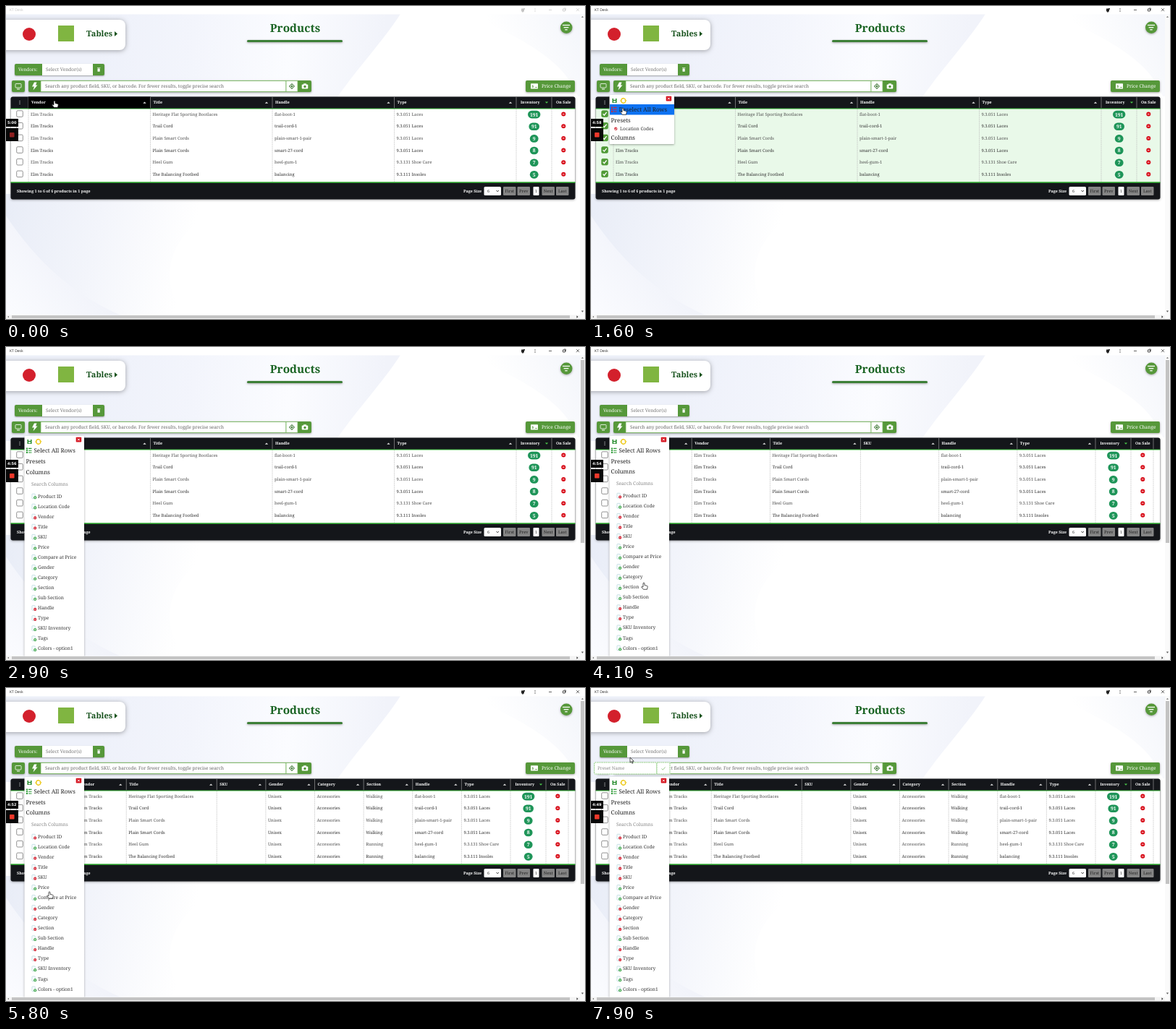
Animation of 800 by 433 pixels, one loop 8000 ms. Source, as an HTML page with a canvas:

```html
<!DOCTYPE html>
<html lang="en">
<head>
<meta charset="utf-8">
<title>Products table</title>
<style>
html, body { margin: 0; width: 100%; height: 100%; overflow: hidden; background: #fff; }
canvas { display: block; width: 800px; height: 433px; }
</style>
</head>
<body>
<canvas id="stage"></canvas>
<script>
const canvas = document.getElementById('stage');
const dpr = window.devicePixelRatio || 1;
canvas.width = 800 * dpr;
canvas.height = 433 * dpr;
const c = canvas.getContext('2d');
const GREEN = '#56983a', LIME = '#35b535', INK = '#333';
const LOOP = 8000;
let t = 0;

// Times of the clicks
const OPEN = 500, SELECT = 1200, DESELECT = 1850, EXPAND = 2400, SAVE = 7000;
const ADDED = { 'Product ID': 3250, SKU: 3700, Gender: 4450, Category: 4750, Section: 5350 };
const COLUMNS = ['Product ID', 'Vendor', 'Title', 'SKU', 'Gender', 'Category', 'Section', 'Handle', 'Type'];
const FIELDS = ['Product ID', 'Location Code', 'Vendor', 'Title', 'SKU', 'Price', 'Compare at Price', 'Gender',
  'Category', 'Section', 'Sub Section', 'Handle', 'Type', 'SKU Inventory', 'Tags', 'Colors - option1'];
const ROWS = [
  ['Heritage Flat Sporting Bootlaces', 'flat-boot-1', '9.3.051 Laces', 191],
  ['Trail Cord', 'trail-cord-1', '9.3.051 Laces', 91],
  ['Plain Smart Cords', 'plain-smart-1-pair', '9.3.051 Laces', 9],
  ['Plain Smart Cords', 'smart-27-cord', '9.3.051 Laces', 8],
  ['Heel Gum', 'heel-gum-1', '9.3.131 Shoe Care', 7],
  ['The Balancing Footbed', 'balancing', '9.3.111 Insoles', 5]
].map(([Title, Handle, Type, stock], i) => ({
  Title, Handle, Type, stock, Vendor: 'Elm Tracks', Gender: 'Unisex',
  Category: 'Accessories', Section: i < 4 ? 'Walking' : 'Running'
}));
// Pointer: time, x, y of its tip
const PATH = [[0, 67, 131], [150, 66, 131], [450, 20, 131], [650, 20, 132], [1050, 38, 141], [1300, 40, 142],
  [1600, 44, 141], [1900, 44, 142], [2300, 44, 171], [2700, 46, 173], [3050, 50, 195], [3200, 52, 205],
  [3300, 52, 206], [3600, 52, 260], [3800, 53, 262], [4100, 73, 326], [4350, 60, 303], [4500, 60, 304],
  [4700, 62, 317], [4850, 63, 318], [5100, 66, 331], [5500, 66, 332], [6100, 54, 232], [6600, 40, 141],
  [6900, 33, 130], [7100, 33, 130], [7500, 46, 112], [7900, 54, 96], [8000, 54, 96]];

const mix = (a, b, p) => a + (b - a) * p;
const ease = (a, b) => {
  const p = Math.min(1, Math.max(0, (t - a) / (b - a)));
  return p * p * (3 - 2 * p);
};
const shown = name => !(name in ADDED) || t >= ADDED[name];

function box(x, y, w, h, fill, r = 0, stroke, shadow = 0) {
  c.save();
  c.beginPath();
  c.roundRect(x, y, w, h, r);
  if (shadow) { c.shadowColor = 'rgba(0,0,0,.35)'; c.shadowBlur = shadow * dpr; c.shadowOffsetY = dpr; }
  if (fill) { c.fillStyle = fill; c.fill(); }
  c.shadowColor = 'transparent';
  if (stroke) { c.strokeStyle = stroke; c.lineWidth = .8; c.stroke(); }
  c.restore();
}
function dot(x, y, r, fill) {
  c.beginPath();
  c.arc(x, y, r, 0, 7);
  c.fillStyle = fill;
  c.fill();
}
function line(points, color, width = 1) {
  c.beginPath();
  points.forEach(([x, y]) => c.lineTo(x, y));
  c.strokeStyle = color;
  c.lineWidth = width;
  c.stroke();
}
function poly(points, fill) {
  c.beginPath();
  points.forEach(([x, y]) => c.lineTo(x, y));
  c.fillStyle = fill;
  c.fill();
}
// Text placed by its left (or centre) and the middle of its capitals
function text(s, x, y, size, color = INK, weight = 400, align = 'left', family = '"Noto Serif", serif') {
  c.font = `${weight} ${size}px ${family}`;
  c.textAlign = align;
  c.fillStyle = color;
  c.fillText(s, x, y + size * .36);
}
const arrow = (x, y, color, d = 1, s = 2.2) => poly([[x - s, y + d], [x + s, y + d], [x, y - d * 1.3]], color);

function wave(path, x0, y0, x1, y1, ...colors) {
  const g = c.createLinearGradient(x0, y0, x1, y1);
  colors.forEach((color, i) => g.addColorStop(i / (colors.length - 1), color));
  c.fillStyle = g;
  c.fill(new Path2D(path));
}
function background() {
  box(0, 0, 800, 433, '#fff');
  wave('M0 11H545C520 50 490 80 455 130H0Z', 130, 40, 520, 80, '#eef1fa', '#f3f5fc', '#fbfcff', '#f1f3fa');
  wave('M640 11C700 40 770 70 790 125H800V11Z', 690, 70, 790, 20, '#fff', '#f4f6fb');
  wave('M0 260H330C230 300 200 370 250 433H0Z', 0, 290, 250, 350, '#e9edf7', '#f3f5fb', '#fff');
  wave('M0 290C40 350 90 400 170 433H0Z', 0, 430, 90, 350, '#fbfcff', '#f1f3fa');
}

function titleBar() {
  const ink = t < OPEN ? '#c4c4c4' : '#222';
  box(0, 0, 800, 11.5, '#fff');
  text('KT Desk', 5, 5.5, 5, ink, 400, 'left', '"Open Sans", sans-serif');
  box(712, 3.5, 4, 4, ink, .5);
  dot(716, 4, 1.1, ink);
  dot(714, 7.8, 1, ink);
  [-2, 0, 2].forEach(d => dot(731, 5.5 + d, .6, ink));
  line([[750, 5.5], [754, 5.5]], ink, .7);
  box(769.5, 4, 3, 3, null, 0, ink);
  line([[770.7, 3], [773.5, 3], [773.5, 6]], ink, .6);
  line([[788, 3.2], [792, 7.2]], ink, .7);
  line([[792, 3.2], [788, 7.2]], ink, .7);
}

function pageHead() {
  box(-10, 19, 175, 42, '#fff', 8, null, 6);
  dot(32, 39, 9, '#d3202c');
  box(72, 27, 22, 22, '#80b541');
  text('Tables', 111, 38, 11, '#17521d', 700);
  poly([[150, 35], [150, 42], [154, 38.5]], '#17521d');
  text('Products', 399.5, 30, 15.4, '#1b6424', 600, 'center');
  box(333, 47, 132, 3, '#3c7f36', 1.5, null, 3);
  box(766, 21.5, 16.5, 16.5, GREEN, 8.3, null, 3);
  [[5, 26.5], [3.4, 29.7], [1.7, 32.8]].forEach(([w, y]) => line([[774 - w, y], [774 + w, y]], '#fff', 1.3));
}

function toolbar() {
  box(12, 80, 124, 16, GREEN, 2, null, 2);
  text('Vendors:', 17, 88, 6.3, '#fff');
  box(50, 80, 70, 16, '#fff');
  text('Select Vendor(s)', 55, 88, 6.5, '#777');
  box(126.5, 86.6, 3.2, 4.2, '#fff', .5);
  line([[126, 85.6], [130.4, 85.6]], '#fff', .7);

  box(8, 103, 18, 16, GREEN, 2, null, 3);
  box(13, 107.5, 8, 5.5, null, .8, '#fff');
  line([[15, 115], [19, 115]], '#fff', 1);
  box(31, 103, 391, 16, GREEN, 2, null, 3);
  poly([[39, 105.5], [42.5, 105.5], [41, 109.5], [43.5, 109.5], [37.5, 116.5], [39, 111.5], [36, 111.5]], '#fff');
  box(48, 103.4, 339, 15.2, '#fff', 0, '#74b35c');
  text('Search any product field, SKU, or barcode. For fewer results, toggle precise search', 54, 111, 6.37, '#666');
  box(387, 103.4, 16, 15.2, '#fff', 0, '#74b35c');
  c.beginPath();
  c.arc(395, 111, 2.7, 0, 7);
  c.strokeStyle = '#2d6b22';
  c.lineWidth = .8;
  c.stroke();
  dot(395, 111, 1.2, '#2d6b22');
  [[-1, 0], [1, 0], [0, -1], [0, 1]].forEach(([x, y]) =>
    line([[395 + x * 2.7, 111 + y * 2.7], [395 + x * 4.2, 111 + y * 4.2]], '#2d6b22', .8));
  box(408.7, 108.5, 8.6, 6, '#fff', 1);
  box(411, 107.2, 4, 2, '#fff', .5);
  dot(413, 111.5, 1.7, GREEN);

  box(718, 103, 68, 16, GREEN, 2, null, 3);
  box(725, 107.3, 10, 7.2, '#fff', .6);
  text('$', 728, 111, 5, GREEN, 700, 'center');
  line([[731, 112.5], [734, 112.5]], GREEN, .7);
  text('Price Change', 740, 111, 6.5, '#fff', 500);
}

function checkbox(x, y, on) {
  box(x - 4.3, y - 4.3, 8.6, 8.6, on ? '#4f9a36' : '#fff', 1.5, on ? '#4f9a36' : '#777');
  if (on) line([[x - 2.4, y], [x - .7, y + 2], [x + 2.6, y - 2.2]], '#fff', 1.3);
}

function table() {
  const cols = COLUMNS.filter(shown);
  const wide = cols.length === 4;
  const right = wide ? 705 : 697;
  const shift = right - 705;
  const selected = t >= SELECT && t < DESELECT;
  const titleW = Math.max(wide ? 0 : 125, (right - 31) / cols.length);
  const colW = (right - 31 - titleW) / (cols.length - 1);
  const rowY = i => 149.6 + i * 16.65;

  box(6.5, 125.5, 780, 142, '#14161a', 3, null, 3);
  box(6.5, 142, 780, 102, selected ? '#e9f9e9' : '#fff');
  line([[6.5, 142], [786.5, 142]], LIME, 1);
  line([[6.5, 244], [786.5, 244]], LIME, 1.4);
  [-2, 0, 2].forEach(d => dot(19, 133.5 + d, .6, '#fff'));

  const divider = x => {
    line([[x, 126], [x, 141]], '#aaa', .6);
    c.setLineDash([1, .6]);
    line([[x, 143], [x, 243]], '#bbb', .7);
    c.setLineDash([]);
  };
  let x = 31;
  divider(x);
  for (const name of cols) {
    const w = name === 'Title' ? titleW : colW;
    if (name === 'Vendor' && t < 200) box(x, 125.5, w, 16, '#000');
    text(name, x + 4, 133.5, 5.4, '#fff', 700);
    arrow(x + w - 8, 133.8, '#ddd');
    ROWS.forEach((row, i) => text(row[name] || '', x + 3, rowY(i), 5.9, i % 2 ? '#333' : '#505050'));
    x += w;
    divider(x);
  }
  divider(754 + shift);
  if (!wide) divider(777);
  text('Inventory', 711 + shift * .95, 133.5, 5.3, '#fff', 700);
  arrow(747 + shift, 133.5, '#4bc94b', -1);
  text('On Sale', 760 + shift, 133.5, 5.4, '#fff', 700);
  ROWS.forEach((row, i) => {
    const y = rowY(i), w = 9 + String(row.stock).length * 2.8;
    checkbox(19, y - .5, selected);
    box(729.7 + shift - w / 2, y - 4.8, w, 10.6, '#1f9559', 5.3);
    text(row.stock, 729.7 + shift, y + .5, 6.8, '#fff', 700, 'center');
    dot(770.3 + shift, y, 3, '#d8101c');
    line([[769 + shift, y], [771.6 + shift, y]], '#fff', .8);
  });

  text('Showing 1 to 6 of 6 products in 1 page', 15, 256, 5.4, '#fff', 600);
  text('Page Size', 632, 256, 5.4, '#fff', 700);
  box(660.5, 250, 23.5, 12, '#fff', 1.5);
  text('6', 665, 256, 5.4);
  line([[677.5, 255], [679.2, 256.8], [680.9, 255]], '#222', .9);
  [['First', 687], ['Prev', 706.5], ['Next', 740.5], ['Last', 760]].forEach(([s, bx]) => {
    box(bx, 250, 17.5, 12, '#858585', 1);
    text(s, bx + 8.75, 256, 5.8, '#222', 500, 'center');
  });
  box(728.5, 250, 8, 12, '#fff', 1);
  text('1', 732.5, 256, 5.4, INK, 400, 'center');
}

function menu() {
  if (t < OPEN) return;
  const p = ease(EXPAND, EXPAND + 600);
  const deselect = t >= SELECT && t < DESELECT;
  const right = deselect ? 115 : 108;
  const bottom = Math.min(428, mix(191, 450, p));
  const width = right - 25.5;
  box(25.5, 123, width, bottom - 123, '#fff', 1, null, 3);
  c.save();
  c.beginPath();
  c.rect(25.5, 122, width, bottom - 122);
  c.clip();

  box(29.5, 128, 6, 6, '#248c2c', .6);
  box(31, 128, 3, 2, '#fff');
  box(31, 131.3, 3, 2, '#fff');
  c.strokeStyle = '#ecc60d';
  c.lineWidth = 1.3;
  [.3, 3.44].forEach(a => {
    c.beginPath();
    c.arc(44.7, 131, 3.2, a, a + 2.5);
    c.stroke();
  });
  arrow(41.6, 130.7, '#ecc60d', 1, 1.8);
  arrow(47.8, 131.3, '#ecc60d', -1, 1.8);
  box(right - 11.3, 124.7, 7.5, 6.8, '#d5121e', .8);
  line([[right - 9, 126.7], [right - 6.2, 129.5]], '#fff', 1);
  line([[right - 6.2, 126.7], [right - 9, 129.5]], '#fff', 1);

  const overSelect = t > 950 && t < 2050;
  if (overSelect) box(26, 136, width, 14.5, '#0d72f2');
  const icon = deselect ? '#c8283c' : '#2b9a35';
  [-2.8, 0, 2.8].forEach(d => {
    box(28, 142.2 + d, 2, 2, icon);
    line([[31, 143.2 + d], [35.5, 143.2 + d]], icon, 1.1);
  });
  text(deselect ? 'Deselect All Rows' : 'Select All Rows', 38.5, 143, 8, '#222');

  const glow = ease(6350, 6500) * (1 - ease(6620, 6800));
  c.globalAlpha = glow;
  box(26, 151, width, 13.5, '#1f7d25');
  c.globalAlpha = 1;
  text('Presets', 27.5, 158, 8, glow > .5 ? '#74200f' : '#222');
  if (p < 1) {
    c.globalAlpha = (1 - p) ** 2;
    dot(34.3, 169.8, 2.2, '#d43c48');
    line([[33, 170], [34, 171], [37, 167.5]], '#fff', .7);
    text('Location Codes', 40, 170, 6.45);
    c.globalAlpha = 1;
  }
  text('Columns', 27.5, mix(182, 172, p), 8, '#222');
  if (p > 0) {
    const drop = (1 - p) * 10;
    text('Search Columns', 35, 189 + drop, 6.6, '#888');
    FIELDS.forEach((name, i) => {
      const y = 205.5 + i * 14.05 + drop * 1.2;
      const active = COLUMNS.includes(name) && shown(name);
      const color = active ? '#d62534' : '#36a343';
      box(36, y - 3.2, 4.2, 6.5, '#fff', .5, '#b9d8df');
      dot(40.2, y + 2, 2.1, color);
      line([[39, y + 2], [41.4, y + 2]], '#fff', .6);
      if (!active) line([[40.2, y + .8], [40.2, y + 3.2]], '#fff', .6);
      text(name, 44, y, 6.5);
    });
  }
  c.restore();
}

function presetBox() {
  if (t < SAVE) return;
  c.globalAlpha = ease(SAVE, SAVE + 200);
  box(4, 102.5, 105.5, 17, '#fff', 1);
  c.setLineDash([1.5, 1]);
  box(4.5, 103, 86.5, 16, '#fff', 1, '#5cb848');
  box(91, 103, 18, 16, '#fff', 1, '#5cb848');
  c.setLineDash([]);
  text('Preset Name', 9, 111, 6.2, '#888');
  line([[97.5, 111.5], [99.3, 113.3], [102.5, 109.5]], '#8fc481', .9);
  c.globalAlpha = 1;
}

function scrollbars() {
  box(0, 427.5, 793, 5.5, '#f4f4f4');
  box(8, 428, 771, 4, '#c3c3c3');
  poly([[2, 430], [4, 428.7], [4, 431.3]], '#777');
  poly([[790.5, 430], [788.5, 428.2], [788.5, 431.8]], '#333');
  box(793, 12, 7, 421, '#fafafa');
  if (t >= EXPAND + 200) box(794, 18, 5, 253, '#c3c3c3');
  arrow(796.5, 15, '#888', 1, 1.6);
  arrow(796.5, 422.5, '#555', -1, 1.6);
}

function recorder() {
  const left = 300 - Math.floor(t * .0014 + .3);
  const clock = Math.floor(left / 60) + ':' + String(left % 60).padStart(2, '0');
  box(0, 156, 17, 11, '#080808');
  text(clock, 8.3, 161.5, 5, '#fff', 700, 'center', '"DejaVu Sans", sans-serif');
  box(0, 169, 17, 18, '#080808');
  box(5, 175, 6.5, 6.5, t < 150 ? '#8e2020' : '#f0382a', .8);
}

const ARROW = new Path2D('M0 0V7.2L1.7 5.7L2.9 8.3L4 7.8L2.9 5.3H5.2Z');
const HAND = new Path2D('M-1 .8Q0-.8 1 .8V3.6L4.6 4.4Q5.4 4.8 5.2 6L4.5 9.3H-.6L-3.4 5.9Q-3.2 4.6-1 6Z');
function pointer() {
  if (t > 2720 && t < 2980) return;
  const i = PATH.findIndex(k => k[0] > t);
  const a = PATH[i - 1], b = PATH[i];
  const p = ease(a[0], b[0]);
  c.save();
  c.translate(mix(a[1], b[1], p), mix(a[2], b[2], p));
  const shape = t > 7250 ? ARROW : HAND;
  c.fillStyle = '#fff';
  c.fill(shape);
  c.strokeStyle = '#111';
  c.lineWidth = .7;
  c.stroke(shape);
  c.restore();
}

function draw(now) {
  t = now % LOOP;
  c.setTransform(dpr, 0, 0, dpr, 0, 0);
  c.textRendering = 'geometricPrecision';
  [background, titleBar, pageHead, toolbar, table, menu, presetBox, scrollbars, recorder, pointer].forEach(f => f());
}
const start = performance.now();
function tick() {
  draw(performance.now() - start);
  requestAnimationFrame(tick);
}
tick();
</script>
</body>
</html>
```
